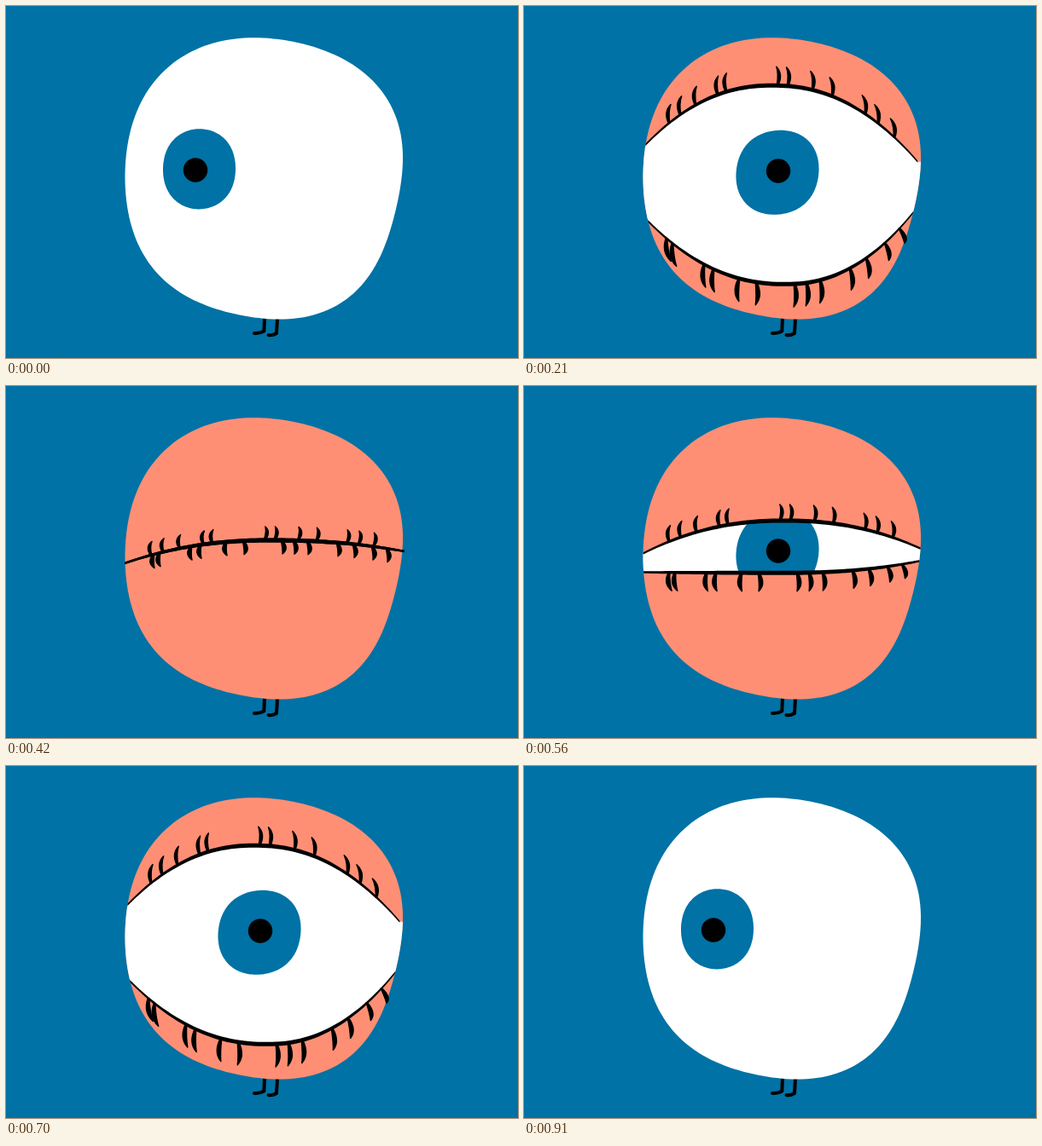
An HTML page with a canvas for the animation above (980 ms loop, 600 by 413 pixels).

```html
<!DOCTYPE html>
<html lang="en">
<head>
<meta charset="utf-8">
<title>Blinking eye</title>
<style>
  html, body { margin: 0; width: 100%; height: 100%; overflow: hidden; background: #0072a5; }
  canvas { display: block; width: 600px; height: 413px; }
</style>
</head>
<body>
<canvas id="stage" width="600" height="413"></canvas>
<script>
const ctx = document.getElementById('stage').getContext('2d');
const BLUE = '#0072a5', SKIN = '#ff8f74', INK = '#000', WHITE = '#fff';
const STEP = 70;

// look: 0 = aside, 1 = ahead; shut: 0 = half open, 1 = closed, null = no lids
const POSES = [
  { look: 0, shut: null },
  { look: 0.5, shut: null },
  { look: 1, shut: null },
  { look: 1, shut: -0.9 },
  { look: 1, shut: 0 },
  { look: 1, shut: 0.5 },
  { look: 1, shut: 1 }
];

// Interpolates numbers or nested lists of numbers.
const mix = (a, b, k) => Array.isArray(a) ? a.map((v, i) => mix(v, b[i], k)) : a + (b - a) * k;

// A round shape whose radius is varied by [cos, sin] harmonics.
function blob([cx, cy, r, waves]) {
  const path = new Path2D();
  for (let i = 0; i < 180; i++) {
    const a = i * Math.PI / 90;
    const d = waves.reduce((sum, [c, s], n) =>
      sum + c * Math.cos((n + 1) * a) + s * Math.sin((n + 1) * a), r);
    path.lineTo(cx + d * Math.cos(a), cy + d * Math.sin(a));
  }
  path.closePath();
  return path;
}

const BODY = blob([302, 202.5, 166.5, [[0, -1.5], [-1.3, 0.65], [-0.7, -1.8], [-3.2, -2.6], [0.2, -0.7]]]);
const IRIS_ASIDE = [226.5, 191.3, 45.2, [[0, 0], [-2.3, -0.2], [0, 0], [-0.4, 0]]];
const IRIS_AHEAD = [297, 195.3, 49.6, [[0, 0], [-0.5, -1.6], [0, 0], [-0.7, 0]]];

// Lid curves: left end, apex, right end.
const LID_SHUT = [[139, 208], [310, 181], [467, 194]];
const UPPER = {
  lid: [[140, 185], [300, 134.8], [464, 188]],
  lashes: [170, 183, 201, 227, 237, 297, 309, 338, 361, 400, 415, 434],
  dir: -1, width: 2.8,
  drift: x => 6 * Math.sin((x - 170) / 70),
  lean: x => 2 - (x - 170) / 40,
  length: () => 22
};
const LOWER = {
  lid: [[140, 229], [308, 257.5], [464, 216]],
  lashes: [167, 174, 211, 222, 252, 272, 317, 331, 347, 382, 401, 423, 440],
  dir: 1, width: 4,
  drift: () => 6,
  lean: x => 8 * ((x - 300) / 150) ** 2 - 1,
  length: x => 27 - 12 * Math.max(0, (x - 350) / 100) ** 2
};

const along = ([from, apex, to], x) => {
  const end = x < apex[0] ? from : to;
  return Math.abs((x - apex[0]) / (end[0] - apex[0])) ** 2.2;
};
const lidY = (lid, x) => mix(lid[1][1], (x < lid[1][0] ? lid[0] : lid[2])[1], along(lid, x));

// Points of a lid curve, moved down by offset(x).
function lidPoints(lid, offset = () => 0) {
  const pts = [], from = lid[0][0], to = lid[2][0];
  for (let i = 0; i <= 60; i++) {
    const x = mix(from, to, i / 60);
    pts.push([x, lidY(lid, x) + offset(x)]);
  }
  return pts;
}

function polygon(pts) {
  const path = new Path2D();
  pts.forEach(p => path.lineTo(...p));
  path.closePath();
  return path;
}

function fill(path, color) {
  ctx.fillStyle = color;
  ctx.fill(path);
}

function drawLegs() {
  ctx.strokeStyle = INK;
  ctx.lineWidth = 4;
  ctx.stroke(new Path2D('M303 366 L302.3 381.5 Q297 384.5 291 384 M318 366 L317 384 Q312 387 307.5 386'));
}

function drawEyeball(look) {
  fill(blob(mix(IRIS_ASIDE, IRIS_AHEAD, look)), BLUE);
  fill(blob([mix(222, 298, look), mix(192.5, 193.5, look), 14.2, []]), INK);
}

// A line that thins out towards both ends.
function drawLidLine(lid) {
  const half = x => 2.5 - 1.3 * along(lid, x);
  const under = lidPoints(lid, half).reverse();
  fill(polygon([...lidPoints(lid, x => -half(x)), ...under]), INK);
}

function drawLashes(side, lid, shut) {
  const k = Math.max(0, shut);
  ctx.lineWidth = 1.4;
  for (const x0 of side.lashes) {
    const x = x0 + k * side.drift(x0), y = lidY(lid, x);
    const tall = side.dir * mix(side.length(x0), 16, k);
    const tip = x + mix(side.lean(x0), 1, k);
    const mid = (x + tip) / 2 + (x < 260 ? -5 : 5);
    const lash = new Path2D();
    lash.moveTo(x - 0.8, y);
    lash.quadraticCurveTo(mid - side.width, y + tall * 0.6, tip, y + tall);
    lash.quadraticCurveTo(mid + side.width, y + tall * 0.6, x + 0.8, y);
    fill(lash, INK);
    ctx.stroke(lash);
  }
}

function drawLids(shut, look) {
  const top = mix(UPPER.lid, LID_SHUT, shut);
  const low = mix(LOWER.lid, LID_SHUT, shut);
  fill(BODY, SKIN);

  ctx.save();
  if (shut < 1) {
    ctx.clip(BODY);
    const gap = polygon([
      [100, top[0][1]], ...lidPoints(top), [500, top[2][1]],
      [500, low[2][1]], ...lidPoints(low).reverse(), [100, low[0][1]]
    ]);
    ctx.save();
    ctx.clip(gap);
    fill(gap, WHITE);
    drawEyeball(look);
    ctx.restore();
  }
  drawLidLine(top);
  drawLidLine(low);
  ctx.restore();

  drawLashes(UPPER, top, shut);
  drawLashes(LOWER, low, shut);
}

function draw({ look, shut }) {
  fill(polygon([[0, 0], [600, 0], [600, 413], [0, 413]]), BLUE);
  drawLegs();
  if (shut === null) {
    fill(BODY, WHITE);
    drawEyeball(look);
  } else {
    drawLids(shut, look);
  }
}

ctx.lineCap = ctx.lineJoin = 'round';
const start = performance.now();
// Plays the poses forwards, then backwards.
function tick() {
  const count = POSES.length;
  const step = Math.floor((performance.now() - start) / STEP) % (2 * count);
  draw(POSES[Math.min(step, 2 * count - 1 - step)]);
  requestAnimationFrame(tick);
}
tick();
</script>
</body>
</html>
```
